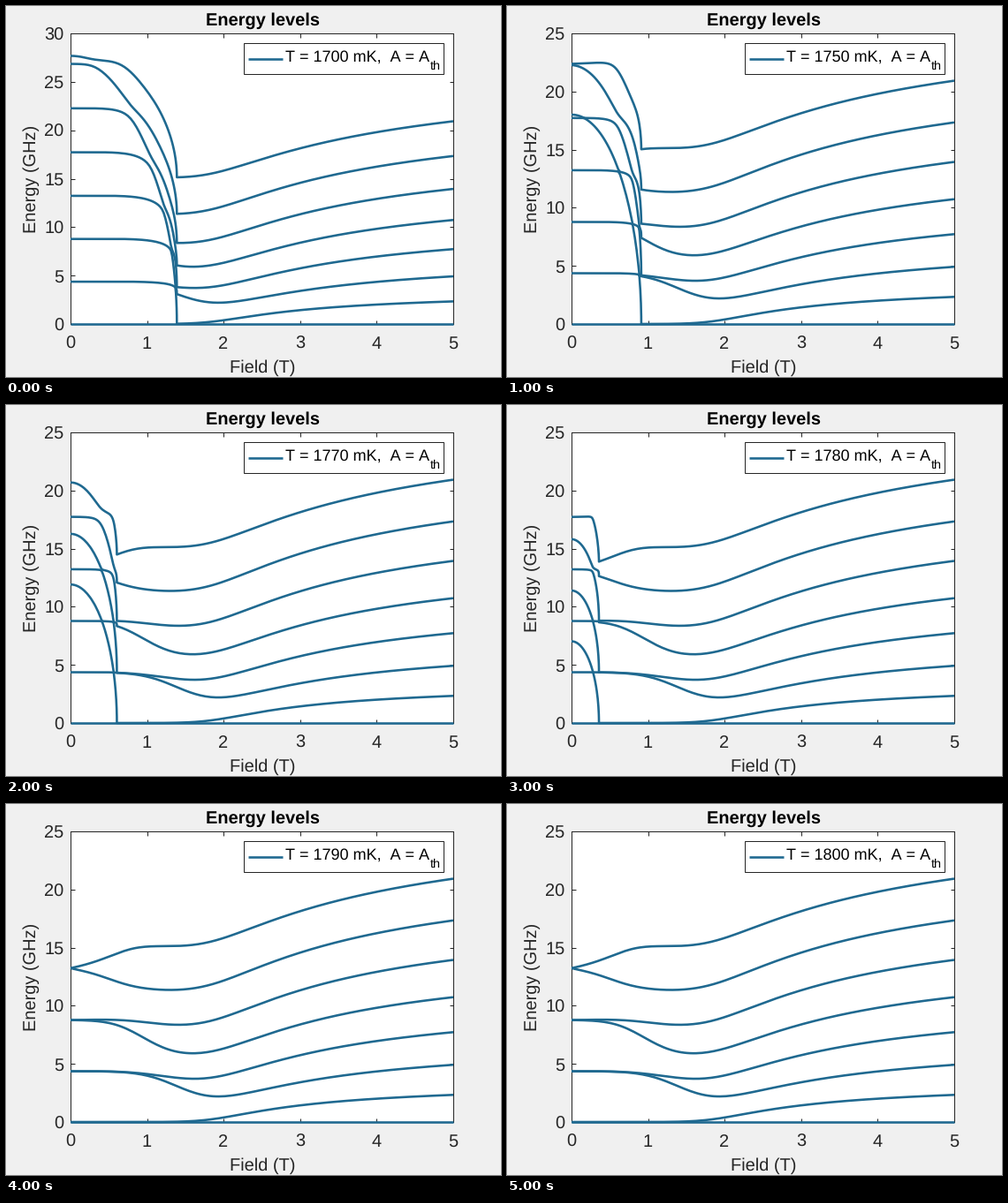
Recreate the animation shown at these times as a matplotlib script. Size 560 by 420 pixels, loop 6 s.

```python
import numpy as np
import matplotlib.pyplot as plt
from matplotlib.animation import FuncAnimation

W, H, DPI = 560, 420, 96
PT = 72 / DPI
BLUE, INK, GRAY = "#1f6990", "#262626", "#f0f0f0"
LEFT, RIGHT, TOP, BOTTOM = 73, 506, 31, 360

plt.rcParams.update({"font.family": "Liberation Sans", "text.hinting": "none",
                     "text.kerning_factor": 6})

# ---- physics: J = 8 ion in a crystal field, I = 7/2 nucleus (GHz, T, K) ----
TEMPS = [1700, 1750, 1770, 1780, 1790, 1800]
T_C = 1.7853
KB = 20.837
G_MU = 1.25 * 13.996
FIELD_GAIN = 1.015
A_HF = 0.8098
MEV = 241.8
KEEP = 6


def spin(j):
    """Return Jz, Jx and the real matrix K with Jy = -iK."""
    m = np.arange(j, -j - 1, -1)
    up = np.diag(np.sqrt(j * (j + 1) - m[1:] * (m[1:] + 1)), 1)
    return np.diag(m), (up + up.T) / 2, (up - up.T) / 2


def crystal_field(jz, jx, k):
    one = np.eye(17)
    x = 72.0
    z2 = jz @ jz
    z4, z6 = z2 @ z2, z2 @ z2 @ z2
    o20 = 3 * z2 - x * one
    o40 = 35 * z4 - (30 * x - 25) * z2 + (3 * x**2 - 6 * x) * one
    o60 = (231 * z6 - (315 * x - 735) * z4
           + (105 * x**2 - 525 * x + 294) * z2
           + (-5 * x**3 + 40 * x**2 - 60 * x) * one)
    up4 = np.linalg.matrix_power(jx + k, 4)
    p4 = up4 + up4.T
    q = 11 * z2 - (x + 38) * one
    o44, o64 = p4 / 2, (q @ p4 + p4 @ q) / 4
    return MEV * (-0.06 * o20 + 3.5e-4 * o40 + 3.6e-3 * o44
                  + 4e-7 * o60 + 7e-5 * o64)


JZ, JX, JK = spin(8)
IZ, IX, IK = spin(3.5)
CF = crystal_field(JZ, JX, JK)


def kron(a, b):
    n = a.shape[1] * len(b)
    return np.einsum("nab,cd->nacbd", a, b).reshape(-1, n, n)


def build(field):
    """Electron-nuclear Hamiltonians and Jz for an array of fields."""
    zeeman = G_MU * FIELD_GAIN * np.atleast_1d(field)
    e, v = np.linalg.eigh(CF - zeeman[:, None, None] * JX)
    e, v = e[:, :KEEP] - e[:, :1], v[:, :, :KEEP]
    x, k, z = (v.transpose(0, 2, 1) @ op @ v for op in (JX, JK, JZ))
    one = np.eye(8)
    ham = kron(e[:, :, None] * np.eye(KEEP), one)
    ham += A_HF * (kron(x, IX) - kron(k, IK) + kron(z, IZ))
    return ham, kron(z, one)


def moment(ham, z, h, temp):
    e, v = np.linalg.eigh(ham - np.reshape(h, (-1, 1, 1)) * z)
    w = np.exp((e[:, :1] - e) / (KB * temp))
    return ((v * (z @ v)).sum(1) * w).sum(1) / w.sum(1)


def chi(field, temp):
    return moment(*build(field), 0.02, temp)[0] / 0.02


COUPLING = 1 / chi(0.0, T_C)


def critical_field(temp):
    if temp >= T_C:
        return 0.0
    lo, hi = 0.0, 3.0
    for _ in range(14):
        mid = (lo + hi) / 2
        lo, hi = (mid, hi) if COUPLING * chi(mid, temp) > 1 else (lo, mid)
    return lo


def mean_field(ham, z, temp):
    lo, hi = np.zeros(len(ham)), np.full(len(ham), 4.0)
    for _ in range(14):
        mid = (lo + hi) / 2
        grow = COUPLING * moment(ham, z, mid, temp) > mid
        lo, hi = np.where(grow, mid, lo), np.where(grow, hi, mid)
    return lo


def spectrum(temp):
    """Eight lowest levels against field, ordered phase first."""
    bc = critical_field(temp)
    field = np.linspace(bc, 5, 130)
    ham, z = build(field)
    if bc:
        below = bc * np.sin(np.linspace(0, np.pi / 2, 48)[:-1])
        ham_b, z_b = build(below)
        ham_b -= mean_field(ham_b, z_b, temp)[:, None, None] * z_b
        field, ham = np.append(below, field), np.append(ham_b, ham, axis=0)
    e = np.linalg.eigvalsh(ham)[:, :8]
    return field, e - e[:, :1]


SPECTRA = [spectrum(t / 1000) for t in TEMPS]

# ---- drawing ----
fig = plt.figure(figsize=(W / DPI, H / DPI), dpi=DPI, facecolor=GRAY)
ax = fig.add_axes([LEFT / W, 1 - BOTTOM / H,
                   (RIGHT - LEFT) / W, (BOTTOM - TOP) / H])
ax.set_xlim(0, 5)
ax.set_xticks(range(6))
ax.tick_params(direction="in", length=4.5 * PT, width=PT, color=INK,
               top=True, right=True, labelbottom=False, labelleft=False)
for side in ax.spines.values():
    side.set(linewidth=PT, color=INK)


def label(x, y, s, size=20, color=INK, **kw):
    kw = {"ha": "center", "va": "baseline", **kw}
    return fig.text(x / W, 1 - y / H, s, fontsize=size * PT, color=color, **kw)


label(290, 22, "Energy levels", color="black", weight="bold")
label(290, 415, "Field (T)")
label(34, 195.5, "Energy (GHz)", rotation=90, rotation_mode="anchor")
for i in range(6):
    label(LEFT - 0.5 + i * (RIGHT - LEFT) / 5, 388, str(i))
y_labels = [label(65.5, 0, "", ha="right") for _ in range(7)]

curves = [ax.plot([], [], color=BLUE, lw=2.6 * PT, clip_on=False, zorder=3,
                  solid_capstyle="butt")[0] for _ in range(8)]

fig.add_artist(plt.Rectangle((269 / W, 1 - 77 / H), 226 / W, 35 / H,
                             fc="white", ec=INK, lw=PT, zorder=5))
fig.add_artist(plt.Line2D([274 / W, 313 / W], [1 - 59.5 / H] * 2, color=BLUE,
                          lw=2.6 * PT, solid_capstyle="butt", zorder=6))
legend = label(316, 63, "", 18, "black", ha="left", zorder=6)
label(480, 72, "th", 14.4, "black", ha="left", zorder=6)


def draw(i):
    top = 30 if i == 0 else 25
    ax.set_ylim(0, top)
    ax.set_yticks(range(0, top + 1, 5))
    for n, text in enumerate(y_labels):
        value = 5 * n
        y = BOTTOM - (BOTTOM - TOP) * value / top + 7.5
        text.set_text(str(value) if value <= top else "")
        text.set_y(1 - y / H)
    field, levels = SPECTRA[i]
    for curve, level in zip(curves, levels.T):
        curve.set_data(field, level)
    legend.set_text(f"T = {TEMPS[i]} mK,  A = A")
    return curves


anim = FuncAnimation(fig, draw, frames=len(TEMPS), interval=1000,
                     init_func=lambda: draw(0), repeat=True, repeat_delay=0)
plt.show()
```
